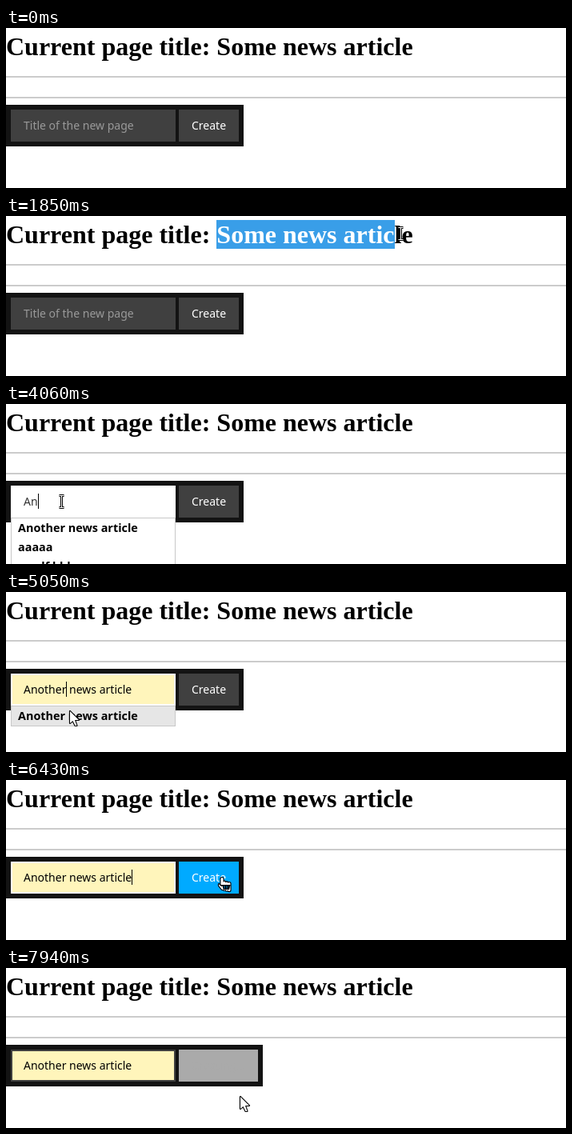
Recreate the animation shown at these times as an HTML page with a canvas. Size 700 by 200 pixels, loop 8000 ms.

```html
<!DOCTYPE html>
<html>
<head>
<meta charset="utf-8">
<style>
html, body { margin: 0; height: 100%; overflow: hidden; background: #fff; }
canvas { display: block; }
</style>
</head>
<body>
<canvas id="stage" width="700" height="200"></canvas>
<script>
const ctx = document.getElementById('stage').getContext('2d', { alpha: false });
const LOOP = 8000;
const SANS = '14px "Noto Sans", sans-serif';
const BOLD = 'bold 14.4px "Noto Sans", sans-serif';
const SERIF = 'bold 32px "Liberation Serif", serif';
const TITLE = 'Current page title: Some news article';
const SELECT_FROM = TITLE.indexOf('Some');
const VALUE = 'Another news article';
const HISTORY = [VALUE, 'aaaaa', 'aasdf bbb'];

// Moments of the interaction, in ms
const APPEAR = 150, PRESS = 1130, RELEASE = 2020, FOCUS = 3250;
const TYPE = 3870, KEY_GAP = 145, OPEN = 3920, FILTER = 4130;
const PREVIEW = 5010, PICK = 5370, ENTER = 5930, SUBMIT = 6470, LEAVE = 7270;

// Pointer moves; bend > 1 makes the vertical part lag behind, < 1 lead
const HOME = { x: 538, y: 132 };
const MOVES = [
  { from: APPEAR, to: 950, x: 285, y: 12, bend: 0.5 },
  { from: 950, to: PRESS, x: 268, y: 22, bend: 1 },
  { from: 1170, to: RELEASE, x: 520, y: 22, bend: 1 },
  { from: 2140, to: 2890, x: 70, y: 122, bend: 4 },
  { from: 4860, to: 5120, x: 81, y: 153, bend: 1 },
  { from: 5540, to: 6150, x: 270, y: 122, bend: 1.5 },
  { from: 7070, to: 7450, x: 292, y: 160, bend: 1 }
];

const progress = (t, from, to) => Math.max(0, Math.min(1, (t - from) / (to - from)));
const smooth = k => k * k * (3 - 2 * k);

function pointerAt(t) {
  let { x, y } = HOME;
  for (const m of MOVES) {
    const k = smooth(progress(t, m.from, m.to));
    x += (m.x - x) * k;
    y += (m.y - y) * k ** m.bend;
  }
  return [Math.round(x), Math.round(y)];
}

function rect(x, y, w, h, color) {
  ctx.fillStyle = color;
  ctx.fillRect(x, y, w, h);
}

function text(str, x, y, font, color) {
  ctx.font = font;
  ctx.fillStyle = color;
  ctx.fillText(str, x, y);
}

function width(str, font) {
  ctx.font = font;
  return ctx.measureText(str).width;
}

function mix(a, b, k) {
  return `rgb(${a.map((v, i) => Math.round(v + (b[i] - v) * k))})`;
}

function drawHeading(t, x) {
  text(TITLE, 0, 34, SERIF, '#000');
  if (t < PRESS || t >= FOCUS) return;
  const edge = n => width(TITLE.slice(0, n), SERIF);
  const reach = t < RELEASE ? x - 3 : Infinity;
  let end = SELECT_FROM;
  while (end < TITLE.length && edge(end + 1) <= reach) end++;
  const left = Math.round(edge(SELECT_FROM)), right = Math.round(edge(end));
  ctx.save();
  ctx.beginPath();
  ctx.rect(left, 5, right - left, 36);
  ctx.clip();
  rect(left, 5, right - left, 36, '#399ee8');
  text(TITLE, 0, 34, SERIF, '#fff');
  ctx.restore();
}

function drawInput(t) {
  const focused = t >= FOCUS && t < SUBMIT;
  const filled = t >= PREVIEW;
  const keys = Math.max(0, Math.floor((t - TYPE) / KEY_GAP) + 1);
  const typed = t >= PICK ? VALUE : VALUE.slice(0, Math.min(keys, 'Another'.length));
  const shown = filled ? VALUE : typed;
  rect(6, 102, 206, 40, focused ? '#fff' : '#404040');
  if (filled) rect(8, 104, 202, 36, '#fff5bb');
  if (shown) text(shown, 22, 127, SANS, filled ? '#000' : '#333');
  else text('Title of the new page', 22, 127, SANS, '#999');
  if (focused) rect(Math.floor(22.45 + width(typed, SANS)), 112, 1, 19, '#000');
}

function drawButton(t) {
  const sent = t >= SUBMIT;
  const base = [64, 64, 64], hover = [0, 170, 255], gray = [170, 170, 170], white = [255, 255, 255];
  const fill = t < LEAVE ? mix(base, hover, progress(t, ENTER, ENTER + 160))
                         : mix(hover, gray, progress(t, LEAVE, LEAVE + 160));
  const ink = mix(white, gray, progress(t, SUBMIT, SUBMIT + 90));
  rect(216, 102, sent ? 99 : 75, 40, fill);
  text(sent ? 'Creating...' : 'Create', 232, 127, SANS, ink);
}

function drawHistory(t) {
  if (t < OPEN || t >= PICK) return;
  const items = t < FILTER ? HISTORY : HISTORY.slice(0, 1);
  const h = items.length * 24 + 2;
  rect(6, 142, 206, h, '#c8c8c8');
  rect(7, 143, 204, h - 2, '#fff');
  if (t >= PREVIEW) rect(7, 143, 204, 24, '#e6e6e6');
  items.forEach((item, i) => text(item, 15, 160 + i * 24, BOLD, '#000'));
}

const arrow = new Path2D('M1 1V16L4.5 13L7.5 19H9.5L7 12H12Z');
const beam = new Path2D('M-3 -7.5H3M0 -7.5V7.5M-3 7.5H3');
const hand = new Path2D('M-1.5 11L-4 8V10L0 15H9L10.5 9H-1.5Z');
for (let i = 0; i < 4; i++) hand.roundRect(-1.5 + 3 * i, i && 4 + i * 0.7, 3, 11, 1.5);

function stroke(shape, color, w) {
  ctx.strokeStyle = color;
  ctx.lineWidth = w;
  ctx.stroke(shape);
}

function drawPointer(x, y) {
  const inRow = y >= 102 && y < 142;
  const overText = (y < 42 && x <= 520) || (inRow && x >= 6 && x < 212);
  const overButton = inRow && x >= 216 && x < 315;
  ctx.save();
  ctx.translate(x, y);
  ctx.lineJoin = 'round';
  if (overText) {
    ctx.translate(-0.5, 0);
    stroke(beam, '#000', 3);
    stroke(beam, '#fff', 1);
  } else {
    const shape = overButton ? hand : arrow;
    stroke(shape, '#000', 2.2);
    ctx.fillStyle = '#fff';
    ctx.fill(shape);
    if (overButton) for (let i = 0; i < 3; i++) rect(1 + 3 * i, 9.5, 1, 4, '#000');
  }
  ctx.restore();
}

function draw(t) {
  const [x, y] = pointerAt(t);
  rect(0, 0, 700, 200, '#fff');
  drawHeading(t, x);
  for (const top of [60, 86]) rect(0, top, 700, 2, '#ccc');
  rect(0, 96, t < SUBMIT ? 297 : 321, 52, '#131313');
  drawInput(t);
  drawButton(t);
  drawHistory(t);
  if (t >= APPEAR) drawPointer(x, y);
}

const start = performance.now();
function tick() {
  draw((performance.now() - start) % LOOP);
  requestAnimationFrame(tick);
}
tick();
</script>
</body>
</html>
```
